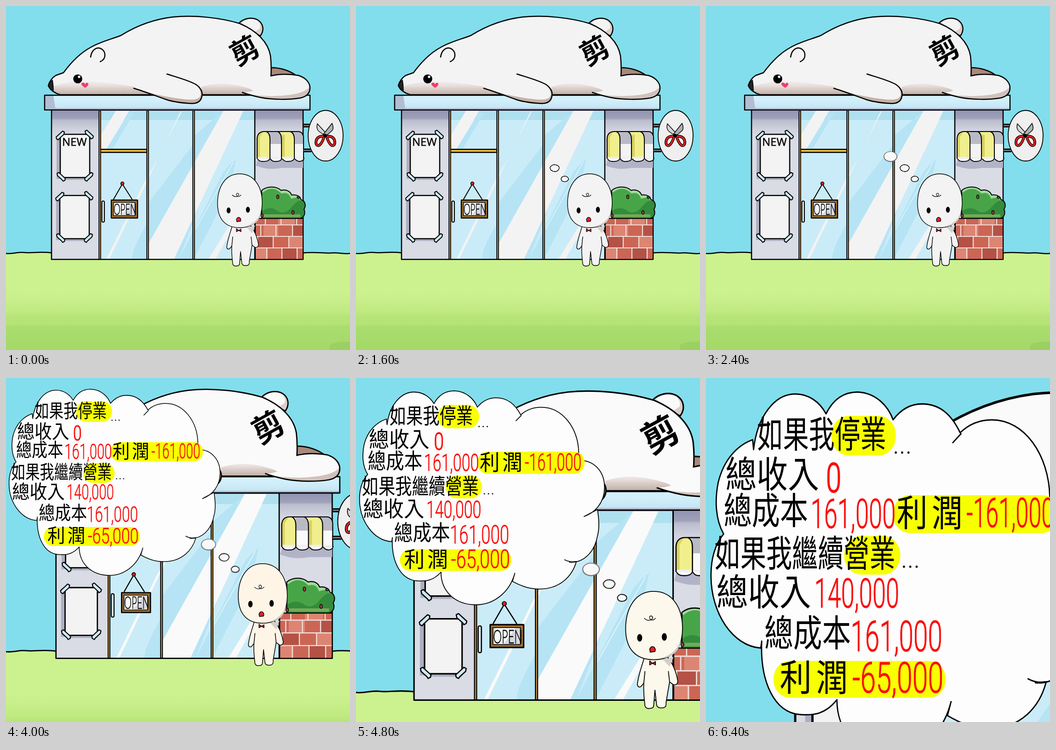
Animation, 748 px wide and 748 px high, one loop 8000 ms. Source, as an HTML page without scripts:

```html
<!DOCTYPE html>
<html lang="zh-Hant">
<head>
<meta charset="utf-8">
<title>Shop closing decision</title>
<style>
html, body { margin: 0; width: 100%; height: 100%; overflow: hidden; background: #82deec; }
svg { display: block; width: 100vw; height: 100vh; stroke-width: 2.5; }
.ink { stroke: #000; stroke-linejoin: round; stroke-linecap: round; }
.fine { stroke-width: 1.4; }
.no { fill: none; }
.white { fill: #f3f3f3; }
.skin { fill: #f3f3f3; }
.white, .skin, #cam, .pop { animation: 8s step-end infinite; }
.white { animation-name: brighten; }
.skin { animation-name: warm; }
#cam { transform-origin: 0 0; animation-name: zoom; }
#b1 { animation-name: show1; }
#b2 { animation-name: show2; }
#b3 { animation-name: show3; }
#thought { animation-name: show4; }
.han { font: 300 37px "Noto Sans CJK TC", "Noto Sans CJK JP", "Noto Sans CJK", sans-serif; }
.num { font: 300 41px Roboto, "Open Sans", sans-serif; fill: #fa0d0d; stroke: #fa0d0d; stroke-width: .5; }
.wide { letter-spacing: 5px; }
.big { font-size: 43px; }
.hand { font: 400 24px "Open Sans", Lato, sans-serif; }
.open { font: 300 33px Lato, "Open Sans", sans-serif; }
.crest { font: 900 62px "Noto Sans CJK TC", "Noto Sans CJK JP", "Noto Sans CJK", sans-serif; }
@keyframes brighten { 0% { fill: #f3f3f3 } 40%, 100% { fill: #fafafa } }
@keyframes warm { 0% { fill: #f3f3f3 } 40% { fill: #fef5e7 } 60%, 100% { fill: #fcf8eb } }
@keyframes show1 { 0% { opacity: 0 } 10%, 100% { opacity: 1 } }
@keyframes show2 { 0% { opacity: 0 } 20%, 100% { opacity: 1 } }
@keyframes show3 { 0% { opacity: 0 } 30%, 100% { opacity: 1 } }
@keyframes show4 { 0% { opacity: 0 } 40%, 100% { opacity: 1 } }
@keyframes zoom {
  0% { transform: none }
  50% { transform: scale(1.098, 1.1062) }
  60% { transform: scale(1.2745, 1.271) }
  70% { transform: translate(-.4px, -7px) scale(1.58, 1.63) }
  80%, 100% { transform: translate(-1px, -17px) scale(1.97, 2.158) }
}
</style>
</head>
<body>
<svg viewBox="0 0 748 748" preserveAspectRatio="none">
<defs>
  <linearGradient id="lawn" x1="0" y1="537" x2="0" y2="748" gradientUnits="userSpaceOnUse">
    <stop offset=".4" stop-color="#ccf290"/><stop offset=".6" stop-color="#c1ea82"/>
    <stop offset=".65" stop-color="#b8e57a"/><stop offset=".74" stop-color="#b3e275"/>
    <stop offset=".76" stop-color="#a9dd6d"/><stop offset="1" stop-color="#a4d968"/>
  </linearGradient>
  <linearGradient id="wall" x1="0" y1="228" x2="0" y2="285" gradientUnits="userSpaceOnUse">
    <stop offset="0" stop-color="#9294b2"/><stop offset=".28" stop-color="#9fa0b9"/>
    <stop offset=".36" stop-color="#bbbccd"/><stop offset=".7" stop-color="#cfd1de"/>
    <stop offset="1" stop-color="#d9dbe5"/>
  </linearGradient>
  <linearGradient id="roof" x1="0" y1="0" x2="0" y2="1">
    <stop offset=".3" stop-color="#d2f0fb"/><stop offset="1" stop-color="#c3e3f2"/>
  </linearGradient>
  <linearGradient id="belly" x1="0" y1="160" x2="0" y2="196" gradientUnits="userSpaceOnUse">
    <stop offset="0" stop-color="#ecdedd" stop-opacity="0"/><stop offset=".35" stop-color="#eae0de"/>
    <stop offset="1" stop-color="#b9a69c"/>
  </linearGradient>
  <path id="bearShape" d="M92 173C95 163 100 156 108 151L125 145C139 126 158 104 184 90C204 78 230 72 250 64C282 44 320 29 362 24C412 19 468 26 508 38C546 54 570 79 575 108C577 124 577 138 576 155L560 193H118C107 190 96 183 92 173Z"/>
  <path id="armShape" d="M350 148C372 155 395 161 412 170C424 178 428 186 426 196C424 208 416 212 404 212C384 211 366 209 350 204C324 195 302 186 278 179"/>
  <path id="legShape" d="M514 188C532 187 550 182 560 172L576 152C596 147 616 148 636 151C652 156 661 167 661 178C661 190 653 197 640 200C616 204 580 204 554 199C538 196 526 192 514 188Z"/>
  <path id="bushShape" d="M556 462V401C568 391 588 391 598 401C610 398 618 403 621 411C632 409 641 415 641 421C651 423 653 435 648 442C652 451 648 460 640 462Z"/>
  <path id="puff" d="M53 80C57 47 76 24 99 24C114 24 126 32 133 44C141 29 153 22 168 22C189 23 202 37 207 50C216 39 227 34 239 34C258 34 271 44 281 63C290 55 301 50 316 50C352 50 379 85 380 128C380 134 380 137 378 141C405 139 424 159 424 187C424 212 409 230 389 237C397 233 404 229 412 225C414 239 416 255 412 270C407 298 388 317 364 315L376 314C369 339 348 361 313 361C295 361 282 356 267 348L271 334C262 367 235 388 205 388C169 388 145 365 145 332C132 347 119 348 104 347C76 345 60 314 62 273C62 275 61 278 61 280C30 278 6 245 6 207C6 189 11 175 20 165C11 151 10 131 14 113C20 91 34 76 52 70Z"/>
  <clipPath id="inBear"><use href="#bearShape"/></clipPath>
  <clipPath id="inArm"><use href="#armShape"/></clipPath>
  <clipPath id="inLeg"><use href="#legShape"/></clipPath>
  <clipPath id="inBush"><use href="#bushShape"/></clipPath>
  <clipPath id="inGlass"><rect x="204" y="228" width="337" height="323"/></clipPath>
  <path id="tape" class="ink" d="M-9 -7L-5 -9L-3 -7L9 4L8 8L4 10L2 7L-8 -2Z" fill="#cdeaf3" stroke-width="2"/>
  <g id="poster">
    <rect x="-8" y="3" width="10" height="94" fill="#abafc0"/>
    <rect x="4" y="88" width="60" height="11" fill="#abafc0"/>
    <rect class="white ink" width="64" height="94"/>
    <use href="#tape" transform="translate(0 2) scale(-1 1)"/>
    <use href="#tape" transform="translate(63 0)"/>
    <use href="#tape" transform="translate(2 92)"/>
    <use href="#tape" transform="translate(62 92) scale(-1 1)"/>
  </g>
  <g id="post"><path d="M0 228V551" stroke="#000" stroke-width="5.500"/><path d="M0 229V550" stroke="#c28f3c" stroke-width="2"/></g>
  <path id="grip" d="M692 283Q675 282 674 296Q674 305 681 303Q688 298 692 283"/>
  <g id="handle" fill="none">
    <use href="#grip" stroke="#000" stroke-width="6"/><use href="#grip" stroke="#dc2222" stroke-width="3.400"/>
  </g>
</defs>

<g id="cam">
  <rect width="748" height="748" fill="#82deec"/>
  <path d="M0 538C15 540 25 534 40 536S75 533 100 537H646C670 534 690 538 708 537S735 540 748 538V748H0Z" fill="url(#lawn)"/>
  <path class="ink no" d="M0 538C15 540 25 534 40 536S75 533 100 537M646 537C670 534 690 538 708 537S735 540 748 538"/>
  <path d="M704 738Q715 729 748 730V748H704Z" fill="#9bd062"/>

  <!-- walls and glass -->
  <rect x="99" y="226" width="547" height="325" fill="url(#wall)"/>
  <g clip-path="url(#inGlass)">
    <rect x="204" y="228" width="337" height="323" fill="#caecf8"/>
    <path d="M204 228H541V248H204Z" fill="#afe0ef"/>
    <path d="M308 415L400 290L473 228L490 248L376 551H275Q270 535 308 470Z" fill="#b6e4f5"/>
    <path d="M500 334Q487 342 472 362L376 551H408L486 400Z" fill="#b6e4f5"/>
    <path d="M308 248H408V300L308 430Z" fill="#caecf8"/>
    <path class="white" d="M473 228H516L365 551H308V520Z"/>
    <path class="white" d="M239 228H268L219 310H204V285Z"/>
    <path d="M268 232H279L232 310H219Z" fill="#b6e4f5"/>
    <path class="white" d="M383 228L350 292L378 232ZM331 331L316 362L224 551H218L300 385Z"/>
    <path class="white" d="M485 478L494 482L455 551H440Z"/>
    <path d="M494 340L412 485" stroke="#e5f6fb" stroke-width="1.500"/>
  </g>
  <path d="M206 315H306" stroke="#000" stroke-width="9"/>
  <path d="M206 315H305" stroke="#eebc42" stroke-width="4"/>
  <use href="#post" x="204"/><use href="#post" x="308"/><use href="#post" x="408"/>
  <path class="ink" d="M541 228V551"/>
  <path class="ink no" d="M99 226V551H646V226"/>

  <use href="#poster" x="118" y="279"/>
  <use href="#poster" x="117" y="412"/>
  <text class="hand" x="122" y="304" stroke="#000" stroke-width=".5">NEW</text>

  <!-- door -->
  <rect class="ink" x="208.500" y="424" width="5.500" height="46" rx="2.700" fill="#d9e5ed" stroke-width="2"/>
  <path class="ink no" d="M234 420L253 387L274 420" stroke-width="2"/>
  <circle class="ink" cx="253" cy="386" r="3.500" fill="#d92525" stroke-width="1.500"/>
  <rect class="ink" x="229" y="422" width="57" height="39" fill="#a7752e"/>
  <rect class="ink fine" x="233.500" y="427" width="47" height="29" fill="#d6d8df"/>
  <path class="white" d="M238 428H272L252 455H235Z"/>
  <text class="open" transform="translate(234 454) scale(.56 1)" stroke="#000" stroke-width=".6">OPEN</text>

  <!-- awning -->
  <path d="M548 330H646V352H600Q570 358 543 347Z" fill="#b2b3c7"/>
  <path d="M560 273H637Q647 275 647 288V332H546V288Q547 274 560 273Z" fill="#f1ef8d"/>
  <path class="white" d="M567 273Q575 276 575 290V332H600V290Q600 277 593 273ZM619 273Q627 276 627 290V332H647V288Q647 275 637 273Z"/>
  <path d="M574 280Q574 276 570 273H593Q600 277 600 300H575ZM626 285Q626 276 620 273H637Q647 275 647 300H627Z" fill="#b9bac6"/>
  <path d="M546 300V288Q547 274 560 273L552 285V330H546ZM600 300V280H606V330H600Z" fill="#d8d264"/>
  <path class="ink white" d="M546 330Q549 338 557 338Q572 339 574 331Q578 339 587 338Q598 338 600 331Q605 339 613 338Q625 338 627 331Q632 338 639 338Q647 337 648 331Z" stroke-width="1.800"/>
  <path d="M547 330H647" stroke="#efefef" stroke-width="4"/>
  <path class="ink no" d="M546 331V288Q547 274 560 273H637Q647 275 647 288V331M566 273Q574 276 574 290V332M591 273Q599 277 599 290V332M618 273Q627 276 627 290V332" stroke-width="2"/>

  <!-- planter -->
  <use href="#bushShape" fill="#47a548"/>
  <g clip-path="url(#inBush)">
    <path d="M556 403Q580 384 600 404Q616 400 622 415Q642 409 643 423" fill="none" stroke="#a0d99a" stroke-width="7"/>
    <path d="M556 446Q574 434 590 445T622 436T652 426V463H556Z" fill="#348b3b"/>
    <path d="M556 456H640" stroke="#72ac58" stroke-width="6"/>
  </g>
  <use href="#bushShape" class="ink no" stroke-width="2"/>
  <g class="ink" fill="#a34345" stroke-width="1.300">
    <ellipse cx="591" cy="415" rx="2.500" ry="4"/><ellipse cx="636" cy="416" rx="3" ry="2"/>
    <ellipse cx="624" cy="449" rx="2.500" ry="4"/><ellipse cx="557" cy="456" rx="2.500" ry="3.500"/>
  </g>
  <rect x="542" y="463" width="104" height="88" fill="#cb6655"/>
  <path d="M560 476H592V501H560ZM615 502H646V526H615ZM542 526H569V551H542ZM592 463H628V476H592Z" fill="#dd8573"/>
  <path d="M542 502H582V526H542ZM600 526H632V551H600ZM624 476H646V501H624Z" fill="#b45246"/>
  <path d="M542 476H646M542 501H646M542 526H646M564 463V476M598 463V476M632 463V476M554 476V501M587 476V501M623 476V501M547 501V526M581 501V526M615 501V526M567 526V551M600 526V551M633 526V551" stroke="#f1ded8" stroke-width="2.200"/>
  <rect class="ink no" x="542" y="462" width="104" height="89" stroke-width="2"/>

  <!-- hanging sign -->
  <path d="M646 260H661M646 314H664" stroke="#000" stroke-width="8"/>
  <path d="M647 260H661M647 314H664" stroke="#777a83" stroke-width="3"/>
  <ellipse class="ink" cx="695" cy="282" rx="38" ry="55" fill="#efefef" stroke-width="1.800"/>
  <path class="ink" d="M677 256Q674 268 681 273L695 283L699 280Z" fill="#d5d6d8" stroke-width="1.500"/>
  <path class="ink" d="M709 255Q714 267 708 272L695 283L690 279Z" fill="#aeb0b4" stroke-width="1.500"/>
  <use href="#handle"/>
  <use href="#handle" transform="translate(1389) scale(-1 1)"/>
  <circle cx="694" cy="282" r="4"/>

  <!-- roof -->
  <rect x="84" y="194" width="577" height="32" fill="url(#roof)"/>
  <path d="M84 194H103L107 222H661V226H84Z" fill="#b3bdd3"/>
  <rect class="ink no" x="84" y="194" width="577" height="32"/>

  <!-- bear -->
  <path class="ink" d="M506 38C516 27 534 23 547 30C560 38 562 53 553 65Z" fill="#dccdc8"/>
  <path class="white" d="M512 36Q528 23 546 32Q555 40 552 49L538 58Z"/>
  <path class="ink" d="M576 134C596 134 617 140 632 152H576Z" fill="#a9897b"/>
  <use href="#bearShape" class="white"/>
  <g clip-path="url(#inBear)">
    <path d="M100 176Q140 160 205 166T290 179L350 196H92ZM425 176Q470 160 530 180L560 196H425Z" fill="url(#belly)"/>
  </g>
  <use href="#bearShape" class="ink no"/>
  <use href="#legShape" class="white"/>
  <path clip-path="url(#inLeg)" d="M520 190Q570 200 618 193T662 165V206H520Z" fill="#d2c1bb"/>
  <path class="ink no" d="M576 152C596 147 616 148 636 151C652 156 661 167 661 178C661 190 653 197 640 200C616 204 580 204 554 199C538 196 526 192 514 188"/>
  <use href="#armShape" class="white"/>
  <path clip-path="url(#inArm)" d="M280 180Q340 198 390 203T415 172H430V215H350Z" fill="#c6b1a7"/>
  <use href="#armShape" class="ink no"/>
  <path class="ink" d="M92 173Q95 165 101 161Q103 172 103 184Q95 180 92 173Z" fill="#242424" stroke-width="1.500"/>
  <circle cx="156" cy="158.500" r="9.800"/><circle cx="159" cy="154" r="2.700" fill="#fff"/>
  <path d="M172 178C163 172 162 168 166 167Q170 165 172 170Q176 164 179 169Q180 173 172 178Z" fill="#f13d69"/>
  <path class="ink no" d="M184 111C186 96 196 89 205 92C218 97 219 115 205 121"/>
  <text class="crest" transform="translate(519 96) rotate(-29)" x="-31" y="23">剪</text>

  <!-- customer -->
  <path class="skin ink fine" d="M492 478C488 492 481 510 480 525Q481 530 486 528L491 522C490 538 492 550 493 561Q495 567 503 565Q508 565 508 559L510 534L513 560Q515 566 525 564Q530 563 529 555L535 520L542 525Q549 526 549 518C546 502 540 488 532 478Z"/>
  <path d="M519 480Q536 481 542 477L535 494L526 484Z" fill="#d5cfca"/>
  <path class="ink no fine" d="M491 522L493 502M535 520L533 502"/>
  <path class="skin ink fine" d="M508 365C541 365 558 395 557 431C556 463 540 482 508 482C476 482 460 462 460 429C460 393 477 365 508 365Z"/>
  <path d="M556 440Q551 471 518 480Q546 479 553 455Z" fill="#cfc9c5"/>
  <ellipse cx="484" cy="444.500" rx="4.300" ry="6.500"/><ellipse cx="526" cy="443" rx="4.300" ry="6.500"/>
  <path class="ink" d="M501 464Q503 458 508 460Q512 463 510 468L502 469Z" fill="#e9202a" stroke-width="1.300"/>
  <path class="ink no" d="M492 411Q497 416 503 414Q509 410 504 407Q499 407 502 413Q506 416 511 411" stroke-width="1.100"/>
  <path class="ink" d="M506 488L501 484V491L506 488L511 485V491Z" fill="#d91f32" stroke-width="1.200"/>

  <!-- thought -->
  <g class="ink" fill="#f8f8f8" stroke-width="1.400">
    <path id="b1" class="pop" d="M446 375Q448 370 454 370Q462 371 462 377Q460 382 454 382Q446 382 446 375Z"/>
    <path id="b2" class="pop" d="M422 351Q425 345 432 345Q441 346 442 352Q440 360 432 360Q422 359 422 351Z"/>
    <g id="b3" class="pop">
      <ellipse cx="401" cy="327.500" rx="14" ry="10.500" stroke="#777" stroke-width="2"/>
      <ellipse cx="401" cy="327" rx="12.500" ry="9" stroke="#fff"/>
    </g>
  </g>
  <g id="thought" class="pop">
    <use href="#puff" class="ink fine" fill="#fdfdfd"/>
    <path class="ink no fine" d="M273 73L282 64M356 311Q366 316 376 314"/>
    <g fill="#f7ff00">
      <rect x="139" y="46" width="71" height="40" rx="19"/>
      <rect x="207" y="126" width="183" height="38" rx="18"/>
      <rect x="153" y="167" width="62" height="39" rx="19"/>
      <rect x="75" y="293" width="190" height="37" rx="18"/>
    </g>
    <g class="han">
      <text transform="translate(57 78) scale(.77 1)">如果我停業</text>
      <text transform="translate(22 118) scale(.93 1)">總收入</text>
      <text transform="translate(20 155) scale(.84 1)">總成本</text>
      <text class="wide" transform="translate(211 157) scale(.92 1)">利潤</text>
      <text transform="translate(10 198) scale(.77 1)">如果我繼續營業</text>
      <text transform="translate(12 237) scale(.94 1)">總收入</text>
      <text transform="translate(65 278) scale(.86 1)">總成本</text>
      <text class="wide" transform="translate(82 323) scale(.95 1)">利潤</text>
    </g>
    <g fill="#111">
      <circle cx="210" cy="83" r="1.200"/><circle cx="217" cy="83" r="1.200"/><circle cx="224" cy="83" r="1.200"/>
      <circle cx="219" cy="198" r="1.200"/><circle cx="226" cy="198" r="1.200"/><circle cx="233" cy="198" r="1.200"/>
    </g>
    <g class="num">
      <text transform="translate(133 123) scale(.74 1)" style="stroke-width:1">0</text>
      <text transform="translate(116 159) scale(.65 1)">161,000</text>
      <text transform="translate(288 158) scale(.62 1)">-161,000</text>
      <text transform="translate(120 239) scale(.65 1)">140,000</text>
      <text class="big" transform="translate(160 283) scale(.67 1)">161,000</text>
      <text class="big" transform="translate(162 325) scale(.72 1)">-65,000</text>
    </g>
  </g>
</g>
</svg>
</body>
</html>
```
